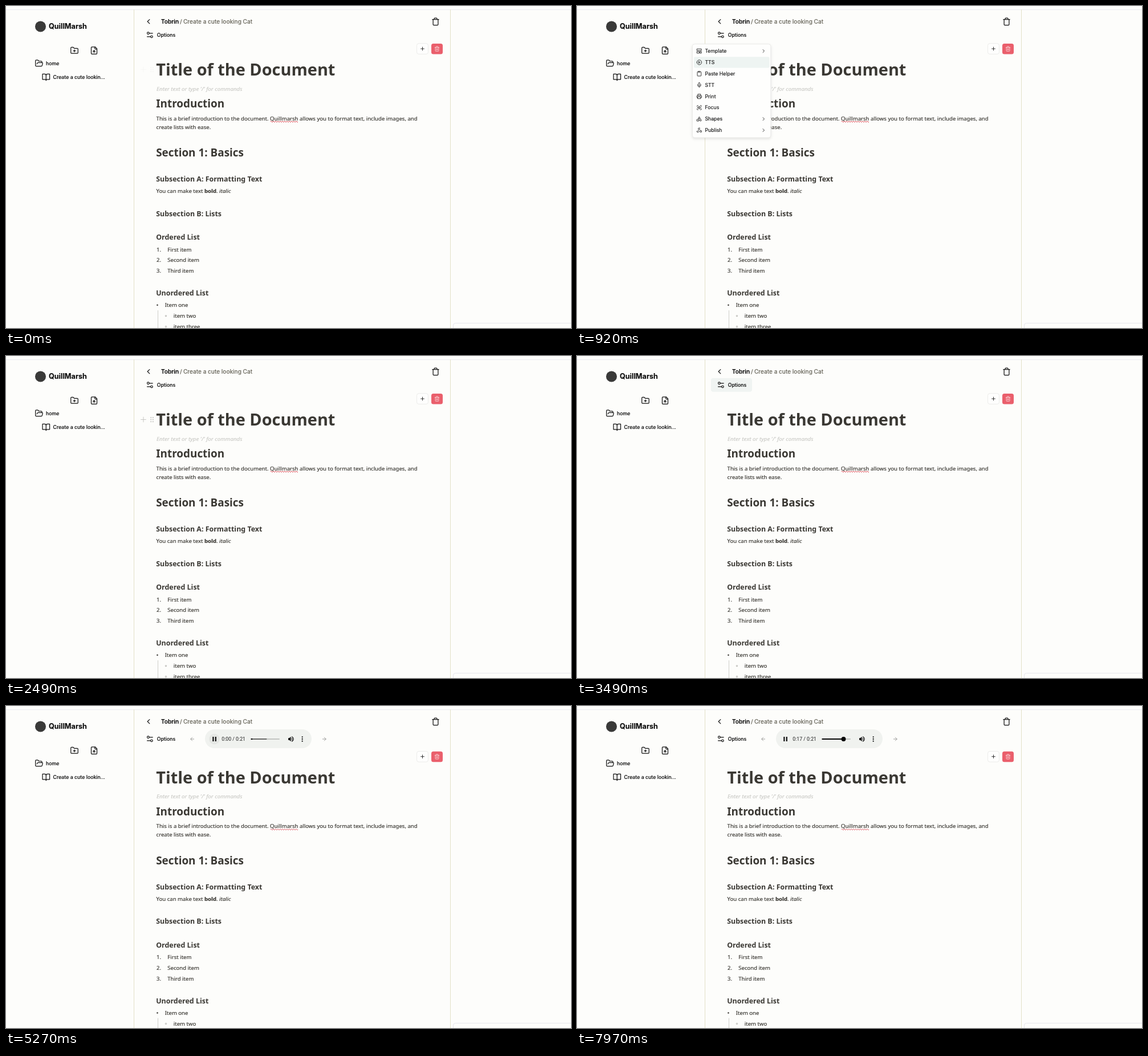
Recreate the animation shown at these times as an HTML page. Size 991 px wide and 565 px high, loop 8 s.

```html
<!DOCTYPE html>
<html lang="en">
<head>
<meta charset="utf-8">
<title>Document editor</title>
<style>
html, body { margin: 0; width: 100%; height: 100%; overflow: hidden; background: #fdfdfb; }
svg { display: block; width: 991px; height: 565px; }
text { white-space: pre; }
.ui { font: 500 8.75px Inter, sans-serif; fill: #0c0c0c; stroke: #0c0c0c; stroke-width: .12px; }
.item { font-weight: 400; }
.crumb { font-size: 10.05px; }
.trail { fill: #6d6b60; stroke: #6d6b60; }
.brand { font-size: 12.6px; font-weight: 700; }
.doc { font: 9.57px "Noto Sans", "Open Sans", sans-serif; fill: #3a3833; stroke: #3a3833; stroke-width: .18px; }
.h1, .h2, .h3 { font-weight: 700; stroke: none; }
.h1 { font-size: 28.9px; }
.h2 { font-size: 18.9px; }
.h3 { font-size: 12.45px; }
.hint { font-size: 9.8px; font-style: italic; fill: #cbcbc7; stroke: #cbcbc7; }
.clock { font: 8.75px Roboto, sans-serif; fill: #202020; }
</style>
</head>
<body>
<svg id="stage" viewBox="0 0 991 565"></svg>
<script>
const LOOP = 8000;
const LENGTH = 21;

const rect = (x, y, w, h, fill, r = 0, more = '') =>
  `<rect x="${x}" y="${y}" width="${w}" height="${h}" rx="${r}" fill="${fill}" ${more}/>`;
const line = (d, color, w = 1) => `<path d="${d}" fill="none" stroke="${color}" stroke-width="${w}"/>`;
const text = (cls, x, y, s, more = '') => `<text class="${cls}" x="${x}" y="${y}" ${more}>${s}</text>`;
const group = (id, body, more = '') => `<g id="${id}" ${more}>${body}</g>`;
const ring = (x, y, r) => `M${x - r} ${y}a${r} ${r} 0 1 0 ${2 * r} 0a${r} ${r} 0 1 0 ${-2 * r} 0`;
// Outline icon on a 24-unit grid, centred at x, y
const icon = (name, x, y, size, color = '#111', w = 2) =>
  `<path d="${icons[name]}" transform="translate(${x - size / 2} ${y - size / 2}) scale(${size / 24})"
    fill="none" stroke="${color}" stroke-width="${w}" stroke-linecap="round" stroke-linejoin="round"/>`;

const bin = 'M3 6h18M19 6v14a2 2 0 0 1-2 2H7a2 2 0 0 1-2-2V6M8 6V4a2 2 0 0 1 2-2h4a2 2 0 0 1 2 2v2';
const icons = {
  folderPlus: 'M12 10v6M9 13h6M20 20a2 2 0 0 0 2-2V8a2 2 0 0 0-2-2h-7.9a2 2 0 0 1-1.7-.9l-.8-1.2A2 2 0 0 0 7.9 3H4a2 2 0 0 0-2 2v13a2 2 0 0 0 2 2z',
  fileUp: 'M15 2H6a2 2 0 0 0-2 2v16a2 2 0 0 0 2 2h12a2 2 0 0 0 2-2V7zM14 2v4a2 2 0 0 0 2 2h4M12 12v6M15 15l-3-3-3 3',
  folderOpen: 'm6 14 1.5-2.9A2 2 0 0 1 9.2 10H20a2 2 0 0 1 1.9 2.5l-1.5 6a2 2 0 0 1-2 1.5H4a2 2 0 0 1-2-2V5a2 2 0 0 1 2-2h3.9a2 2 0 0 1 1.7.9l.8 1.2a2 2 0 0 0 1.7.9H18a2 2 0 0 1 2 2v2',
  book: 'M2 3h6a4 4 0 0 1 4 4v14a3 3 0 0 0-3-3H2zM22 3h-6a4 4 0 0 0-4 4v14a3 3 0 0 1 3-3h7z',
  back: 'm15 18-6-6 6-6',
  next: 'm9 18 6-6-6-6',
  left: 'M19 12H5M12 19l-7-7 7-7',
  right: 'M5 12h14M12 5l7 7-7 7',
  plus: 'M5 12h14M12 5v14',
  sliders: 'M20 7h-10M14 17H4' + ring(17, 17, 3) + ring(7, 7, 3),
  bin,
  binLines: bin + 'M10 11v6M14 11v6',
  template: 'M3 3h18v7H3zM3 14h9v7H3zM16 14h5v7h-5z',
  play: ring(12, 12, 10) + 'M10 8l6 4-6 4z',
  clipboard: 'M9 2h6v4H9zM16 4h2a2 2 0 0 1 2 2v14a2 2 0 0 1-2 2H6a2 2 0 0 1-2-2V6a2 2 0 0 1 2-2h2',
  mic: 'M12 2a3 3 0 0 0-3 3v7a3 3 0 0 0 6 0V5a3 3 0 0 0-3-3zM19 10v2a7 7 0 0 1-14 0v-2M12 19v3',
  printer: 'M6 18H4a2 2 0 0 1-2-2v-5a2 2 0 0 1 2-2h16a2 2 0 0 1 2 2v5a2 2 0 0 1-2 2h-2M6 9V3h12v6M6 14h12v8H6z',
  focus: 'M3 7V5a2 2 0 0 1 2-2h2M17 3h2a2 2 0 0 1 2 2v2M21 17v2a2 2 0 0 1-2 2h-2M7 21H5a2 2 0 0 1-2-2v-2M5 12a7.5 7.5 0 0 1 14 0a7.5 7.5 0 0 1-14 0' + ring(12, 12, 1.5),
  shapes: 'M8 10l4-7 4 7zM3 14h7v7H3z' + ring(17.5, 17.5, 3.5),
  publish: 'M18 17h-6c-1.1 0-2 .9-2.5 1.9A4 4 0 0 1 2 17c0-.7.2-1.4.6-2M6 17l3.1-5.8c.5-1 .1-2.2-.5-3.1a4 4 0 1 1 6.9-4M12 6l3.1 5.7C15.7 12.7 16.9 13 18 13a4 4 0 0 1 0 8'
};

function sidebar() {
  return '<circle cx="60.5" cy="36" r="9.5" fill="#3a3a39"/>' +
    text('ui brand', 75, 40.3, 'QuillMarsh') +
    icon('folderPlus', 120, 78, 15) + icon('fileUp', 154.5, 78, 15) +
    icon('folderOpen', 58, 100.5, 15) + text('ui', 70, 103.6, 'home') +
    icon('book', 70.3, 125, 15) + text('ui', 82.5, 128.3, 'Create a cute lookin...');
}

function header() {
  return icon('back', 250, 27.3, 14.5) +
    text('ui crumb', 272, 31, 'Tobrin', 'style="font-weight:600"') +
    text('ui crumb trail', 305, 31, '/') +
    text('ui crumb trail', 311, 31, 'Create a cute looking Cat') +
    icon('bin', 753.5, 27.3, 15);
}

function page() {
  let wave = 'M464 203';
  for (let x = 464; x < 512; x += 4) wave += 'q1 -2.2 2 0t2 0';
  const doc = (x, y, s) => text('doc', x, y, s);
  const head = (n, y, s) => text('doc h' + n, 263.2, y, s);
  let out = rect(720.5, 65.8, 20, 18.6, '#fefefd', 3.5, 'stroke="#ececea"') +
    icon('plus', 730.5, 75, 10) +
    rect(746, 66, 20, 18.5, '#ea5f6c', 3.5) + icon('binLines', 756, 75.2, 10, '#fbdcdf') +
    head(1, 122, 'Title of the Document') +
    text('doc hint', 264, 148.5, 'Enter text or type \'/\' for commands') +
    head(2, 178, 'Introduction') +
    doc(263.6, 200.7, 'This is a brief introduction to the document. Quillmarsh allows you to format text, include images, and') +
    line(wave, '#d8434e', 0.9) +
    doc(263.6, 215.6, 'create lists with ease.') +
    head(2, 264, 'Section 1: Basics') +
    head(3, 308.2, 'Subsection A: Formatting Text') +
    doc(263.6, 328, 'You can make text <tspan font-weight="700">bold</tspan>. <tspan font-style="italic">italic</tspan>') +
    head(3, 368.5, 'Subsection B: Lists') +
    head(3, 410.2, 'Ordered List') +
    head(3, 508.4, 'Unordered List');
  ['First', 'Second', 'Third'].forEach((word, i) => {
    const y = 430.6 + 18.7 * i;
    out += doc(264, y, i + 1 + '.') + doc(283.3, y, word + ' item');
  });
  out += '<circle cx="265.5" cy="524.8" r="1.3" fill="#3d3b37"/>' + doc(278.8, 528.3, 'Item one');
  ['two', 'three'].forEach((word, i) => {
    const y = 547 + 18.7 * i;
    out += `<circle cx="280.5" cy="${y - 3.2}" r="1.1" fill="none" stroke="#8d8b86" stroke-width=".7"/>` +
      doc(293.8, y, 'item ' + word);
  });
  return out + line('M266.5 534V580', '#cfcfca');
}

function handle() {
  let out = icon('plus', 241, 111.5, 15, '#c4c4c1', 1.5);
  for (let i = 0; i < 6; i++)
    out += `<circle cx="${254.3 + 3.6 * (i % 2)}" cy="${108 + 3.6 * (i >> 1)}" r="1" fill="#bdbdba"/>`;
  return out;
}

function options() {
  return rect(235, 38.8, 72, 24, '#f0f4f2', 4, 'id="optionsBg"') +
    icon('sliders', 252.4, 50.8, 14.5) + text('ui', 264.7, 53.9, 'Options');
}

function player() {
  return icon('left', 326.7, 58, 10, '#8c8c8a') + icon('right', 558.3, 58, 10, '#8c8c8a') +
    rect(349, 41, 187, 33, '#f0f2ef', 16.5) +
    '<circle id="ripple" cx="365.5" cy="58" r="9.3" fill="#e3e5e2"/>' +
    '<path id="playMark" d="M362.7 53.7v8.4l6.7-4.2z" fill="#111"/>' +
    '<path id="pauseMark" d="M362.3 54h2.2v8h-2.2zM366.7 54h2.2v8h-2.2z" fill="#111"/>' +
    text('clock', 378.3, 61, '', 'id="clock"') +
    rect(429.5, 57, 50.5, 2, '#c2c4c1', 1) +
    rect(429.5, 57, 28, 2, '#686967', 1, 'id="buffer"') +
    rect(429.5, 57, 0, 2, '#050505', 1, 'id="played"') +
    '<circle id="thumb" cy="58" r="3.9" fill="#050505"/>' +
    group('volume', '<path d="M495 56.3h2l2.6-2.6v8.6l-2.6-2.6h-2z"/>' +
      '<path d="M500.8 56a2.3 2.3 0 0 1 0 4M501 53.8a4.4 4.4 0 0 1 0 8.4" fill="none" stroke="currentColor" stroke-width="1.1"/>', 'fill="currentColor"') +
    [54.3, 58, 61.7].map(y => `<circle cx="519.7" cy="${y}" r="1.15" fill="#111"/>`).join('');
}

const items = [['template', 'Template', 1], ['play', 'TTS'], ['clipboard', 'Paste Helper'], ['mic', 'STT'],
  ['printer', 'Print'], ['focus', 'Focus'], ['shapes', 'Shapes', 1], ['publish', 'Publish', 1]];
const rowY = i => 79 + 19.86 * i;

function menu() {
  return rect(202.3, 66.8, 137.6, 164.2, '#fefefd', 4, 'stroke="#e9e9e7" style="filter:drop-shadow(0 2px 2px rgba(0,0,0,.1))"') +
    rect(205, 0, 132.5, 19.4, '#eef4f2', 2.5, 'id="hover"') +
    items.map(([name, label, sub], i) =>
      icon(name, 214.4, rowY(i), 10) + text('ui item', 224.4, rowY(i) + 3.1, label) +
      (sub ? icon('next', 327.3, rowY(i), 10) : '')).join('');
}

const stage = document.getElementById('stage');
stage.innerHTML = rect(0, 0, 991, 565, '#fdfdfb') +
  line('M0 6.5H991', '#ececef') + line('M224.5 6V565M779.5 6V565', '#e3e1c8') +
  line('M784.5 565V560q0-3.5 4-3.5H991', '#e6e6ec') +
  sidebar() + header() + group('page', page()) + group('handle', handle()) +
  group('options', options()) + group('player', player()) + group('menu', menu());

const el = {};
stage.querySelectorAll('[id]').forEach(node => el[node.id] = node);
const set = (id, name, value) => el[id].setAttribute(name, value);
const show = (id, on) => set(id, 'opacity', +on);

const ramp = (t, from, to) => Math.min(1, Math.max(0, (t - from) / (to - from)));
const smooth = p => p * p * (3 - 2 * p);
const easeOut = p => 1 - (1 - p) ** 2.3;
const fade = (t, from, to) => easeOut(ramp(t, from, to));

// Seconds played, including the two drags on the timeline
function position(t) {
  const played = Math.max(0, t - 5070) / 1000;
  if (t < 6200) return played;
  if (t < 6870) return 1.1 + 2.9 * smooth(ramp(t, 6200, 6600));
  if (t < 7320) return 4 + 12.7 * smooth(ramp(t, 6870, 7320));
  return 16.7 + (t - 7320) / 1000;
}

function draw(t) {
  const open = fade(t, 425, 575);
  const close = fade(t, 1370, 1590);
  const vis = open * (1 - close);
  const scale = 0.95 + 0.05 * vis;
  show('menu', vis);
  set('menu', 'transform', `translate(271 ${64 - 5 * (1 - open)}) scale(${scale}) translate(-271 -64)`);
  show('hover', t >= 640);
  set('hover', 'y', rowY(t < 780 ? 0 : 1) - 9.7);

  const audio = t >= 3950;
  set('page', 'transform', `translate(0 ${audio ? 13.7 : 0})`);
  set('options', 'transform', `translate(0 ${audio ? 7 : 0})`);
  show('player', audio);
  show('optionsBg', fade(t, 200, 350) - fade(t, 430, 580) + fade(t, 2610, 2760) - fade(t, 4200, 4390));
  show('handle', t < 50 ? 0.12 : t >= 2490 && t < 2620);

  const loaded = t >= 4390;
  const playing = t >= 5020;
  const sec = position(t);
  const x = 432 + 43 * sec / LENGTH;
  el.clock.textContent = `0:${String(Math.floor(sec)).padStart(2, '0')} / 0:${loaded ? LENGTH : '00'}`;
  show('playMark', !playing);
  show('pauseMark', playing);
  show('ripple', t >= 4650 && t < 6870 ? 0.85 : 0);
  show('buffer', loaded);
  set('buffer', 'width', t < 7000 ? 28 : Math.min(50.5, x - 429.5));
  set('played', 'width', playing ? x - 429.5 : 0);
  set('thumb', 'cx', x);
  show('thumb', t >= 6150);
  set('volume', 'color', loaded ? '#111' : '#9a9b99');
}

const start = performance.now();
function tick(now) {
  draw(Math.max(0, now - start) % LOOP);
  requestAnimationFrame(tick);
}
draw(0);
requestAnimationFrame(tick);
</script>
</body>
</html>
```
